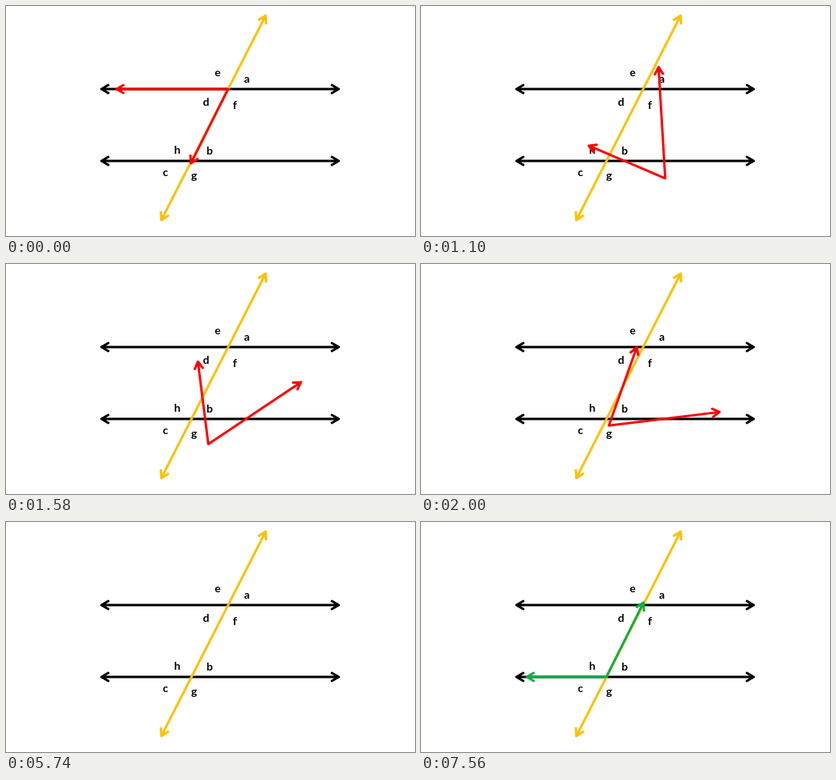
Write an HTML page that moves like this. It is 512 px wide and 288 px high and loops after 8 s.

```html
<!DOCTYPE html>
<html lang="en">
<head>
<meta charset="utf-8">
<title>Alternate interior angles</title>
<style>
  html, body { margin: 0; width: 100%; height: 100%; overflow: hidden; background: #fff; }
  svg { display: block; width: 512px; height: 288px; }
  path { fill: none; stroke-width: 3; stroke-linecap: round; stroke-linejoin: round; }
  text { font: bold 14px Lato, "Open Sans", sans-serif; text-anchor: middle; }
</style>
</head>
<body>
<svg id="stage" viewBox="0 0 512 288"></svg>
<script>
const NS = 'http://www.w3.org/2000/svg';
const stage = document.getElementById('stage');
const LOOP = 8000, STEP = 60;

function add(tag, attrs, content = '') {
  const el = document.createElementNS(NS, tag);
  for (const name in attrs) el.setAttribute(name, attrs[name]);
  el.textContent = content;
  return stage.appendChild(el);
}

// Open arrowhead at `tip`, pointing away from `from`
function head(from, tip) {
  const dx = tip[0] - from[0], dy = tip[1] - from[1], len = Math.hypot(dx, dy);
  const ux = dx / len, uy = dy / len, back = 8.5, half = 5;
  const barb = side => [
    tip[0] - ux * back - uy * half * side,
    tip[1] - uy * back + ux * half * side
  ];
  return `M${barb(1)}L${tip}L${barb(-1)}`;
}

function doubleArrow(a, b, stroke) {
  add('path', { d: `M${a}L${b}` + head(a, b) + head(b, a), stroke });
}

function angle(tip1, vertex, tip2, stroke) {
  const d = `M${tip1}L${vertex}L${tip2}` + head(vertex, tip1) + head(vertex, tip2);
  return add('path', { d, stroke });
}

doubleArrow([119.5, 104], [416.5, 104], '#000');
doubleArrow([119.5, 194], [416.5, 194], '#000');
doubleArrow([325, 12], [194.5, 268], '#ffc000');

const labels = {
  e: [265, 88], a: [301.5, 96], d: [250.5, 125], f: [286.5, 129],
  h: [214.5, 185], b: [255, 186], c: [199.5, 213], g: [235.5, 217]
};
for (const name in labels) {
  const [x, y] = labels[name];
  add('text', { x, y }, name);
}

const red = angle([138.5, 104], [278, 104], [231.5, 197], '#f00');
const green = angle([132.5, 194], [232, 194], [278.5, 101], '#0eae48');

// Share of the half turn reached after a number of steps
const turn = [[0, 0], [5, .153], [11, .481], [14, .64], [19, .8125], [28, .981], [34, 1], [35, 1]];
const slopes = turn.slice(1).map((p, i) => (p[1] - turn[i][1]) / (p[0] - turn[i][0]));
const tangents = turn.map((_, i) => {
  const a = slopes[i - 1] || 0, b = slopes[i] || 0;
  return a * b > 0 ? 2 * a * b / (a + b) : 0;
});

// Monotone cubic through the turn points
function turned(k) {
  let i = 0;
  while (i < turn.length - 2 && k > turn[i + 1][0]) i++;
  const [x0, y0] = turn[i], [x1, y1] = turn[i + 1];
  const w = x1 - x0, u = (k - x0) / w, v = 1 - u;
  return y0 * (1 + 2 * u) * v * v + y1 * u * u * (3 - 2 * u)
    + w * u * v * (tangents[i] * v - tangents[i + 1] * u);
}

function stepsSince(t, start, max) {
  return Math.max(0, Math.min(max, Math.floor((t - start) / STEP) + 1));
}

function draw(t) {
  const p = turned(stepsSince(t, 500, 35));
  const drift = p ** 0.95;
  red.setAttribute('transform',
    `translate(${94 * drift} ${-3 * drift}) rotate(${180 * p} 208.25 150.5)`);
  red.style.opacity = t < 5740 ? 1 : 0;
  green.style.opacity = stepsSince(t, 7140, 8) / 8;
}

function tick() {
  draw(performance.now() % LOOP);
  requestAnimationFrame(tick);
}
tick();
</script>
</body>
</html>
```
